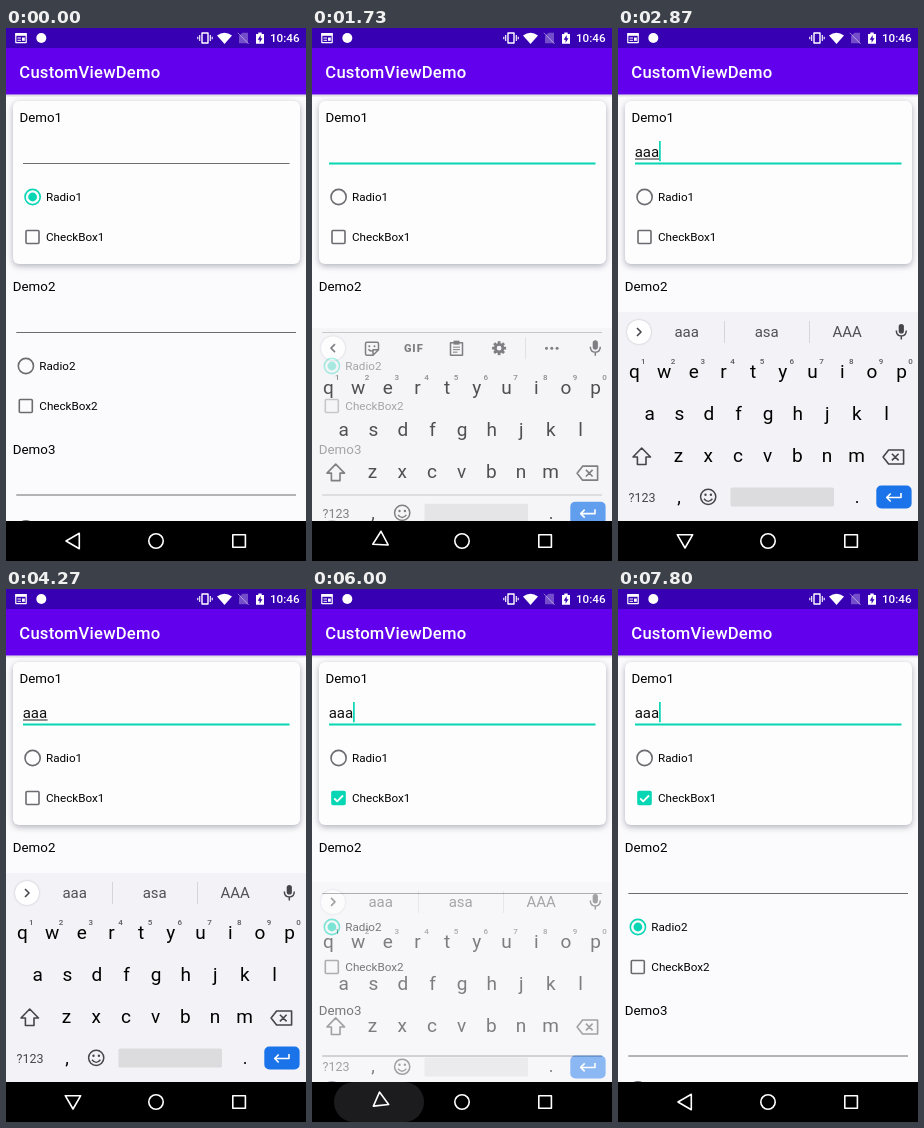
Animation, 300 px wide and 533 px high, one loop 8000 ms. Source, as an HTML page:

```html
<!DOCTYPE html>
<html lang="en">
<head>
<meta charset="utf-8">
<title>Custom view demo</title>
<style>
html, body { margin: 0; width: 100%; height: 100%; overflow: hidden; background: #fbfbfd; }
svg { display: block; width: 100vw; height: 100vh; }
text { font-family: Roboto, "Noto Sans", sans-serif; white-space: pre; }
.mid { text-anchor: middle; }
.line { fill: none; stroke-linejoin: round; }
#card { filter: drop-shadow(0 2px 3px rgba(50, 50, 80, .38)); }
#knob { filter: drop-shadow(0 .5px 1px rgba(50, 50, 80, .3)); }
</style>
</head>
<body>
<svg id="stage" viewBox="0 0 300 533" preserveAspectRatio="none"></svg>
<script>
const LOOP = 8000;
const ACCENT = '#06d6b4', GREY = '#6c6c70', INK = '#000', KEY_INK = '#46464a', NAV = '#fff';
const PAGE = '#fbfbfd', STATUS = '#3700b3', DIVIDER = '#d5d5da';

const text = (x, y, size, str, extra = '') =>
  `<text x="${x}" y="${y}" font-size="${size}" ${extra}>${str}</text>`;
const path = (d, color, width = 1.5, extra = '') =>
  `<path class="line" d="${d}" stroke="${color}" stroke-width="${width}" ${extra}/>`;
const ring = (x, y, r, color, width, extra = '') =>
  `<circle class="line" cx="${x}" cy="${y}" r="${r}" stroke="${color}" stroke-width="${width}" ${extra}/>`;
const disc = (x, y, r, color, extra = '') =>
  `<circle cx="${x}" cy="${y}" r="${r}" fill="${color}" ${extra}/>`;
const box = (x, y, w, h, color, extra = '') =>
  `<rect x="${x}" y="${y}" width="${w}" height="${h}" fill="${color}" ${extra}/>`;

// One form block: title, input line, radio button and check box.
function form(n, x, top) {
  const cx = x + 13;
  return text(x, top + 94, 13.33, 'Demo' + n, `fill="${INK}"`) +
    path(`M${x + 3.5} ${top + 135.5}H${n === 1 ? 283.5 : 290}`, GREY, 1, `id="input${n}"`) +
    ring(cx + .1, top + 169, 7.6, GREY, 1.6, `id="ring${n}"`) +
    disc(cx + .1, top + 169, 0, ACCENT, `id="dot${n}"`) +
    text(x + 26.5, top + 173.3, 11.67, 'Radio' + n, `fill="${INK}"`) +
    box(cx - 6.5, top + 202.5, 13, 13, 'none',
      `id="box${n}" rx="1" stroke="${GREY}" stroke-width="1.6"`) +
    text(x + 26.5, top + 213.3, 11.67, 'CheckBox' + n, `fill="${INK}"`);
}

function statusBar() {
  return box(0, 0, 300, 20, STATUS) + box(0, 20, 300, 46.5, '#6200ee') +
    box(0, 66.5, 300, 2, '#40405a', 'opacity=".15"') +
    text(13.3, 49.5, 16.67, 'CustomViewDemo', 'fill="#fff" font-weight="500" letter-spacing=".208"') +
    path('M9.8 5.7H20.2V14.6H9.8Z', '#fff', 1.2) + box(9.5, 5, 11, 2.8, '#fff') +
    path('M11.5 10H15M11.5 12.3H15', '#fff', 1) + box(16, 9.5, 2.8, 3.3, '#fff') +
    disc(35.3, 10, 5, '#fff') +
    path('M196 5H202V15H196Z', '#fff', 1.4) +
    path('M193.7 7V13M204.3 7V13M191.8 8.7V11.3M206.2 8.7V11.3', '#fff', 1.1) +
    '<path d="M211 7.5Q218.5 1.8 226 7.5L218.5 16Z" fill="#fff"/>' +
    '<path d="M233 8L236.5 4.7H242V15.3H233Z" fill="#fff" opacity=".3"/>' +
    path('M231.8 4.8L242.7 16', '#fff', 1, 'opacity=".45"') +
    '<path d="M250 6H252.3V4.5H255.7V6H258V15.8H250Z" fill="#fff"/>' +
    `<path d="M254.7 7L251.7 11.7H253.6V14.7L256.5 10.3H254.7Z" fill="${STATUS}"/>` +
    text(264, 14.2, 11.67, '10:46', 'fill="#fff" font-weight="500"');
}

function letters(row, x0, step, y) {
  return [...row].map((c, i) =>
    text(x0 + i * step, y, 19, c, `class="mid" fill="${INK}"`)).join('');
}

function tools() {
  const teeth = Array.from({ length: 8 }, (_, i) =>
    `<rect x="185.7" y="297" width="2.8" height="4" fill="${KEY_INK}" transform="rotate(${i * 45} 187.1 304)"/>`).join('');
  return path('M23 300L19 304L23 308', KEY_INK, 1.6) +
    path('M55 298H65Q66.5 298 66.5 299.5V305.5L61 311H55Q53.5 311 53.5 309.5V299.5Q53.5 298 55 298ZM66 305.5H61V310.5M56.5 305Q58 307.5 60.5 306.5', KEY_INK, 1.5) +
    disc(57.3, 302, 1, KEY_INK) + disc(62.5, 302, 1, KEY_INK) +
    text(101.8, 308, 11, 'GIF', `class="mid" fill="${KEY_INK}" font-weight="900" letter-spacing="1"`) +
    path('M138.5 298.5H150.5V311H138.5Z', KEY_INK, 1.5) + box(141.5, 296.5, 6, 4, KEY_INK) +
    path('M141 303H148M141 305.5H148M141 308H145.5', KEY_INK, 1) +
    teeth + ring(187.1, 304, 3.8, KEY_INK, 2.8) +
    path('M213.5 293V315', DIVIDER, 1) +
    [234.5, 239.8, 245.1].map(x => disc(x, 304, 1.5, KEY_INK)).join('');
}

function suggestions() {
  return path('M19 300L23 304L19 308', KEY_INK, 1.6) +
    path('M106.5 293V315M191.5 293V315', DIVIDER, 1) +
    [68.7, 148.7, 229.2].map((x, i) =>
      text(x, 309, 15, '', `class="mid" fill="#505054" id="word${i}"`)).join('');
}

function keyboard() {
  const hints = [...'1234567890'].map((c, i) =>
    text(25.3 + i * 29.7, 336, 8, c, 'class="mid" fill="#5c5c60" font-weight="500"')).join('');
  return box(0, 284, 300, 240, '#f3f3f7') +
    disc(21, 304, 12, '#fff', 'id="knob"') +
    `<g id="tools">${tools()}</g><g id="suggestions">${suggestions()}</g>` +
    box(280.7, 296, 5.2, 9.5, KEY_INK, 'rx="2.6"') +
    path('M278.3 302.5Q278.5 308 283.3 308Q288.1 308 288.3 302.5M283.3 308V311.5', KEY_INK, 1.5) +
    letters('qwertyuiop', 16.5, 29.67, 350.3) + hints +
    letters('asdfghjkl', 31.7, 29.6, 391.8) +
    letters('zxcvbnm', 60.5, 29.7, 434) +
    path('M23.7 420L32.5 429H28V436.5H19.4V429H15Z', KEY_INK, 1.6) +
    path('M270.6 422H285.6V436H270.6L265.1 429ZM273.9 425.7L280.6 432.4M280.6 425.7L273.9 432.4', KEY_INK, 1.6) +
    text(24, 473.5, 12.5, '?123', `class="mid" fill="${KEY_INK}"`) +
    text(61, 474.5, 18, ',', `class="mid" fill="${INK}"`) +
    ring(90.2, 468.8, 7.6, KEY_INK, 1.5) +
    disc(87.5, 466.8, 1.2, KEY_INK) + disc(92.9, 466.8, 1.2, KEY_INK) +
    path('M86 470.7Q90.2 476 94.4 470.7', KEY_INK, 1.4) +
    box(112.5, 459.5, 103.5, 19, '#dcdcde', 'rx="1.5"') +
    text(239, 474.5, 18, '.', `class="mid" fill="${INK}"`) +
    box(258.3, 457.5, 35.3, 23, '#1a73e8', 'rx="5"') +
    path('M283 465V469.5H269M272.7 465.5L268.7 469.5L272.7 473.5', '#fff', 1.6);
}

function navBar() {
  return box(0, 493, 300, 40, '#000') +
    box(22, 493, 90, 40, '#222224', 'id="backGlow" rx="20"') +
    path('M60 513L73.3 505.3V520.7Z', NAV, 1.6, 'id="back"') +
    ring(150, 513, 7.2, NAV, 1.6) +
    path('M226.8 506.7H239.4V519.3H226.8Z', NAV, 1.6);
}

document.getElementById('stage').innerHTML =
  box(0, 0, 300, 533, PAGE) +
  box(7, 73, 287, 163, '#fdfdfe', 'id="card" rx="6"') +
  disc(0, 0, 0, '#606068', 'id="ripple"') +
  form(1, 13.5, 0) + form(2, 6.8, 169) + form(3, 6.8, 331.5) +
  path('', '#fff', 1.8, 'id="check"') +
  text(16.7, 129, 15, '', `id="typed" fill="#111"`) +
  path('', '#222', 1, 'id="compose"') +
  path('', ACCENT, 1.7, 'id="caret"') +
  statusBar() + `<g id="keyboard">${keyboard()}</g>` + navBar() +
  ring(0, 0, 9.5, '#808086', 1, 'id="touch" style="fill:rgba(255,255,255,.65)"');

const $ = id => document.getElementById(id);
const set = (id, attrs) => {
  for (const k in attrs) $(id).setAttribute(k, attrs[k]);
};
const ramp = (t, a, b) => Math.min(1, Math.max(0, (t - a) / (b - a)));
const within = (t, a, b) => t >= a && t < b;
const easeOut = p => 1 - (1 - p) ** 3;

const TAPS = [
  [330, 530, 20, 338], [1000, 1200, 144.7, 113],
  [2330, 2400, 32.3, 391.5], [2570, 2670, 32.3, 391.5], [2770, 2870, 32.3, 391.5],
  [5000, 5200, 27, 209], [5670, 5870, 67, 513]
];
const TYPED_AT = [2400, 2670, 2870];
const CARET_OFF = [[0, 1130], [1630, 2130], [3270, 3730], [4270, 4800], [5400, 5800], [6330, 6800], [7330, 7800]];
const GUESSES = ['', 'as', 'as', 'asa'];

function radio(n, amount) {
  set('dot' + n, { r: 4.4 * amount });
  set('ring' + n, { stroke: amount > .05 ? ACCENT : GREY });
}

function ripple(t) {
  const [start, end, x, y] = t < 3000 ? TAPS[0] : TAPS[5];
  set('ripple', {
    cx: x, cy: y, r: 16 * easeOut(ramp(t, start, end)),
    opacity: t < start ? 0 : .18 * (1 - ramp(t, end, end + 330))
  });
}

function checkBox(t) {
  const fill = ramp(t, 5200, 5300), draw = ramp(t, 5305, 5470);
  set('box1', { fill: fill ? ACCENT : 'none', 'fill-opacity': fill, stroke: fill ? ACCENT : GREY });
  const x = 25.2, y = 212.3;
  set('check', {
    d: draw ? `M${x - 3 * draw} ${y - 3 * draw}L${x} ${y}L${x + 5.8 * draw} ${y - 5.8 * draw}` : 'M0 0',
    opacity: draw ? 1 : 0
  });
}

function keyboardState(t) {
  const enter = ramp(t, 1640, 1930), leave = ramp(t, 5900, 6100);
  const shown = enter > 0 && leave < 1;
  set('keyboard', {
    opacity: shown ? Math.min(easeOut(enter), 1 - leave) : 0,
    transform: `translate(0 ${50 * (1 - easeOut(enter)) + 35 * leave * leave})`
  });
  const turn = ramp(t, 1670, 1870) - ramp(t, 5900, 6070);
  set('back', { transform: `rotate(${-90 * turn} 67 513)` });
}

function typing(t) {
  const count = TYPED_AT.filter(at => t >= at).length;
  const word = 'a'.repeat(count), width = count * 8.2;
  $('typed').textContent = word;
  set('compose', { d: `M17 131h${width}`, opacity: count && t < 5930 ? 1 : 0 });
  set('tools', { opacity: count ? 0 : 1 });
  set('suggestions', { opacity: count ? 1 : 0 });
  [word, GUESSES[count], word.toUpperCase()].forEach((w, i) => { $('word' + i).textContent = w; });

  const hidden = CARET_OFF.some(([a, b]) => within(t, a, b));
  set('caret', { d: `M${17.3 + width} 113V133.3`, opacity: hidden ? 0 : 1 });
  const focused = t >= 1200;
  set('input1', { stroke: focused ? ACCENT : GREY, 'stroke-width': focused ? 1.8 : 1 });
}

function touches(t) {
  const tap = TAPS.find(([a, b]) => within(t, a, b));
  set('touch', tap ? { cx: tap[2], cy: tap[3], opacity: .6 } : { opacity: 0 });
}

function draw(t) {
  const swap = easeOut(ramp(t, 530, 800));
  radio(1, 1 - swap);
  radio(2, swap);
  ripple(t);
  checkBox(t);
  keyboardState(t);
  typing(t);
  touches(t);
  set('backGlow', { opacity: .85 * ramp(t, 5670, 5850) * (1 - ramp(t, 6050, 6420)) });
}

const start = performance.now();
function tick() {
  draw((performance.now() - start) % LOOP);
  requestAnimationFrame(tick);
}
tick();
</script>
</body>
</html>
```
